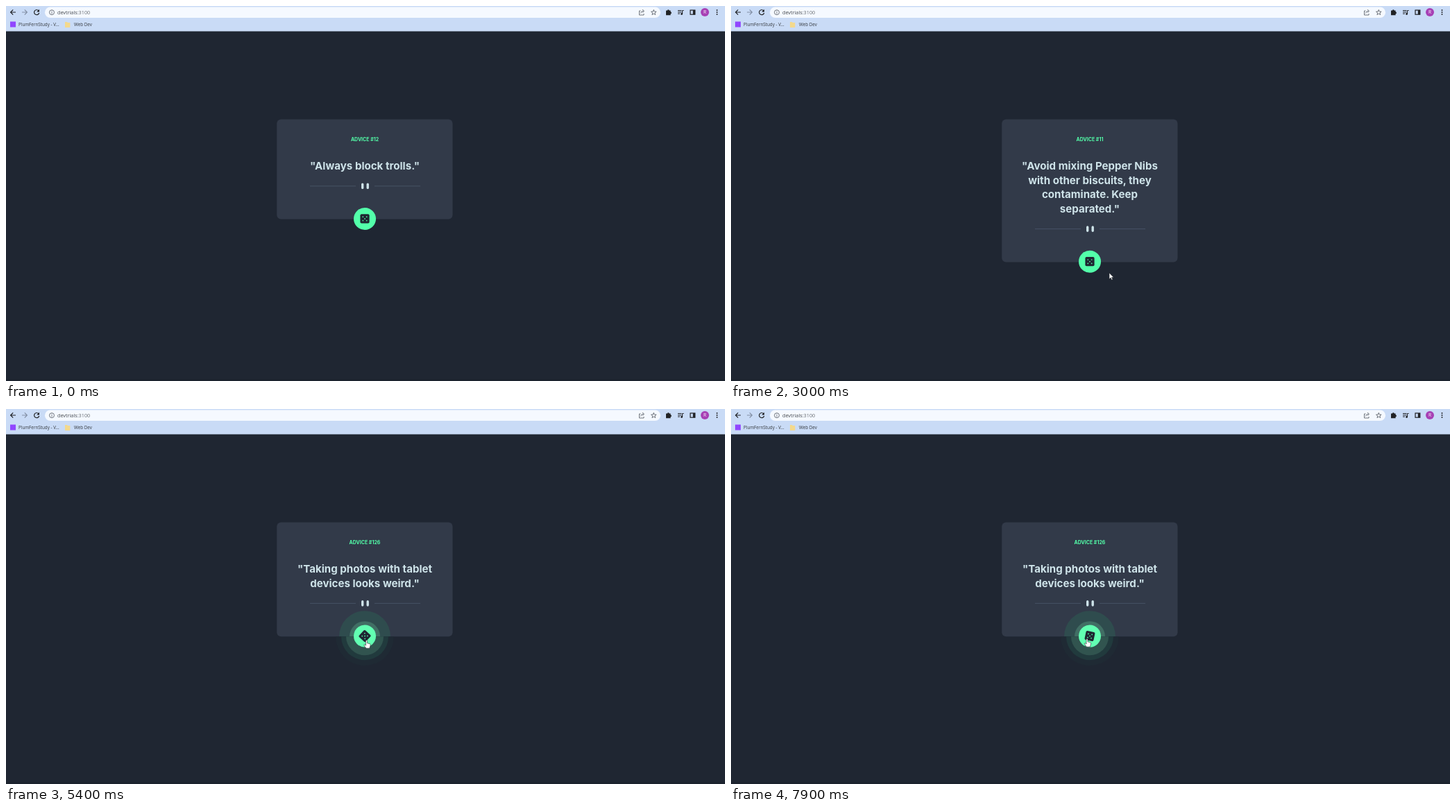
Recreate the animation shown at these times as an HTML page. Size 1036 by 541 pixels, loop 8 s.

```html
<!DOCTYPE html>
<html lang="en">
<head>
<meta charset="utf-8">
<title>Advice generator</title>
<style>
  html, body { margin: 0; width: 100%; height: 100%; overflow: hidden; background: #1f2632; }
  svg { display: block; width: 1036px; height: 541px; }
  .ui { font-family: "Open Sans", sans-serif; }
  .advice { font-family: Inter, sans-serif; font-weight: 700; text-anchor: middle; }
  .line { fill: none; stroke: #202124; stroke-width: 1.2; }
  .thin { fill: none; stroke: #50555c; stroke-width: .8; }
</style>
</head>
<body>
<svg viewBox="0 0 1036 541">
  <rect y="538" width="1036" height="3" fill="#1c232e"/>

  <!-- browser bar -->
  <g class="ui">
    <rect width="1036" height="36.5" fill="#c9dbf6"/>
    <rect x="56" y="1.5" width="887" height="15.5" rx="7.75" fill="#f5f9ff"/>
    <path class="line" d="M14 9H6.6m3.6-3.6L6.6 9l3.6 3.6"/>
    <path class="line" style="stroke:#8390a5" d="M23 9h7.4m-3.6-3.6L30.4 9l-3.6 3.6"/>
    <path class="line" d="M47 6.8A3.6 3.6 0 1 0 47.7 10"/>
    <path d="M48 4.8v3.8h-3.8z" fill="#202124"/>
    <circle class="thin" cx="66" cy="9.2" r="3.5"/>
    <path class="thin" d="M66 7v.9m0 .8v2.5"/>
    <text x="74" y="11.8" font-size="7.26" fill="#45494e">devtrials<tspan fill="#686d73">:3100</tspan></text>

    <path class="thin" d="M914.5 7h-2v6h6.5v-2m-4.5-.5q.5-3.2 4-3.2M917 5l2.5 2.3-2.5 2.3"/>
    <polygon id="star" class="thin"/>
    <path d="M951 6.6h2a1.3 1.3 0 0 1 2.6 0h2v2a1.3 1.3 0 0 1 0 2.6v2h-6.6z" fill="#202124"/>
    <path class="line" style="stroke-width:1" d="M968 6.5h5.5M968 8.8h5.5M968 11.1h3m3.6.3V6.5h2"/>
    <circle cx="973.6" cy="11.5" r="1.4" fill="#202124"/>
    <rect class="line" x="986" y="6" width="6.8" height="6.2"/>
    <path d="M989.8 6h3v6.2h-3z" fill="#202124"/>
    <circle cx="1007" cy="9" r="6" fill="#a740b5"/>
    <text x="1007" y="11.4" font-size="6.5" fill="#fff" text-anchor="middle">R</text>
    <path d="M1024.5 6v6.1" stroke="#202124" stroke-width="1.9" stroke-linecap="round" stroke-dasharray="0 3"/>

    <rect x="6" y="22.5" width="8" height="8" fill="#9147ff"/>
    <text x="18" y="28.8" font-size="6.3" fill="#33373c">PlumFernStudy - V...</text>
    <path d="M85 23h3l1 1h3.3v7H85z" fill="#f3d98d"/>
    <text x="98" y="28.8" font-size="6.3" fill="#33373c">Web Dev</text>
  </g>

  <!-- advice card -->
  <rect id="card" x="390.3" y="163.5" width="253.2" rx="6" fill="#323a49"/>
  <text id="label" class="advice" x="517" y="195.4" font-size="7" fill="#53ffaa"></text>
  <text id="quote" class="advice" font-size="15.1" fill="#cee3e9"></text>

  <!-- everything hung on the card's lower edge -->
  <g id="foot">
    <path d="M-79-47.8h66m27 0h66" stroke="#4c586b" stroke-width=".8"/>
    <path d="M-3.3-50.5v5.3m7.5-5.3v5.3" stroke="#cee3e9" stroke-width="3.4" stroke-linecap="round"/>
    <g id="glow"></g>
    <circle id="button" cy="-.6" r="16"/>
    <g id="dice">
      <rect x="-6.6" y="-6.6" width="13.2" height="13.2" rx="2" fill="#1f2632"/>
      <g id="pips" fill="#53ffaa"></g>
    </g>
  </g>

  <g id="pointer" stroke="#20242b" stroke-width=".6" stroke-linejoin="round" fill="#fff">
    <path id="arrow" d="M0 0v9l2.1-1.9 1.4 3.2 1.5-.7-1.4-3h2.8z"/>
    <path id="hand" d="M-1 1a1 1 0 0 1 2 0v3.3l3.6.8q1.1.3 1 1.5l-.5 2.8-.9 2.3h-4.8l-3-4.3q-.4-1.2.9-1.1L-1 7.6z"/>
    <path id="beam" d="M-1.8-4.2h3.6M0-4.2v8.4m-1.8 0h3.6" fill="none" stroke="#c3ccd5"/>
  </g>
</svg>

<script>
const $ = id => document.getElementById(id);
const LOOP = 8000, STEP = 100, SPIN = 500;
const CENTER = 517, CARD_TOP = 163.5, TEXT_TOP = 220, LINE = 20.6, RADIUS = 16;

const advices = [
  { from: 0, no: 12, lines: ['"Always block trolls."'] },
  { from: 1900, no: 11, lines: ['"Avoid mixing Pepper Nibs', 'with other biscuits, they', 'contaminate. Keep', 'separated."'] },
  { from: 4300, no: 126, lines: ['"Taking photos with tablet', 'devices looks weird."'] }
];

// Pointer moves: start, end, destination; each one eases from the last place
const ENTER = 300;
const moves = [
  [ENTER, 700, 349, 276], [800, 1100, 527, 297], [1800, 1900, 533, 298],
  [2200, 2700, 637, 400], [2700, 3000, 545, 385], [3100, 3400, 525.5, 372],
  [4400, 4900, 519.5, 333.5], [6300, 6700, 509, 333.5], [6800, 7000, 490, 332.5],
  [7100, 7400, 513, 331.5]
];
const clicks = [1705, 3600, 5343, 5945, 7745];

// The CSS "ease" curve
function ease(x) {
  const bezier = (a, b, s) => 3 * a * s * (1 - s) ** 2 + 3 * b * s * s * (1 - s) + s ** 3;
  let lo = 0, hi = 1;
  for (let i = 0; i < 20; i++) {
    const mid = (lo + hi) / 2;
    if (bezier(.25, .25, mid) < x) lo = mid; else hi = mid;
  }
  return bezier(.1, 1, lo);
}

function pointerAt(t) {
  let x = 12, y = 2;
  for (const [start, end, toX, toY] of moves) {
    if (t <= start) break;
    const k = ease(Math.min(1, (t - start) / (end - start)));
    x += (toX - x) * k;
    y += (toY - y) * k;
  }
  return [x, y];
}

const set = (id, name, value) => $(id).setAttribute(name, value);
const show = (id, on) => set(id, 'visibility', on ? 'visible' : 'hidden');

// Glow bands: half discs, above (sweep 1) and below (sweep 0) the card edge
const halfDiscs = (sweep, bands) => Object.entries(bands).reverse().map(([r, fill]) =>
  `<path d="M${-r} 0A${r} ${r} 0 0 ${sweep} ${r} 0Z" fill="${fill}"/>`).join('');
$('glow').innerHTML = halfDiscs(1, { 22: '#416e64', 37: '#2f4c4e' }) +
  halfDiscs(0, { 27: '#31544f', 34: '#213a3d', 42: '#1f2a34' });

const pip = (x, y) => `<circle cx="${x}" cy="${y}" r=".85"/>`;
$('pips').innerHTML = pip(0, 0) + [45, 135, 225, 315].map(a =>
  pip(3.8 * Math.cos(a * Math.PI / 180), 3.8 * Math.sin(a * Math.PI / 180))).join('');

set('star', 'points', Array.from({ length: 10 }, (_, i) => {
  const r = i % 2 ? 1.7 : 4, a = i * Math.PI / 5;
  return [933.3 + r * Math.sin(a), 9.4 - r * Math.cos(a)];
}).join(' '));

let current;
function setAdvice(advice) {
  if (advice === current) return;
  current = advice;
  $('label').textContent = 'ADVICE #' + advice.no;
  $('quote').innerHTML = advice.lines.map((text, i) =>
    `<tspan x="${CENTER}" y="${TEXT_TOP + 16 + i * LINE}">${text}</tspan>`).join('');
}

function draw(t) {
  const advice = advices.findLast(a => a.from <= t);
  const textBottom = TEXT_TOP + advice.lines.length * LINE, bottom = textBottom + 67;
  setAdvice(advice);
  set('card', 'height', bottom - CARD_TOP);
  set('foot', 'transform', `translate(${CENTER} ${bottom})`);

  const click = clicks.findLast(c => c <= t) ?? -SPIN;
  const angle = 360 * ease(Math.min(1, (t - click) / SPIN));
  set('dice', 'transform', `translate(0 -.7) rotate(${angle})`);

  const visible = t >= ENTER, [x, y] = pointerAt(t);
  const hover = visible && Math.hypot(x - CENTER, y - bottom) < RADIUS;
  const onText = Math.abs(x - CENTER) < 97 && y > TEXT_TOP && y < textBottom;
  set('pointer', 'transform', `translate(${x} ${y})`);
  show('hand', hover);
  show('beam', visible && !hover && onText);
  show('arrow', visible && !hover && !onText);
  show('glow', hover);
  set('button', 'fill', hover ? '#62ffb2' : '#53ffaa');
}

function tick() {
  const t = performance.now() % LOOP;
  draw(Math.floor(t / STEP) * STEP);
  requestAnimationFrame(tick);
}
tick();
</script>
</body>
</html>
```
